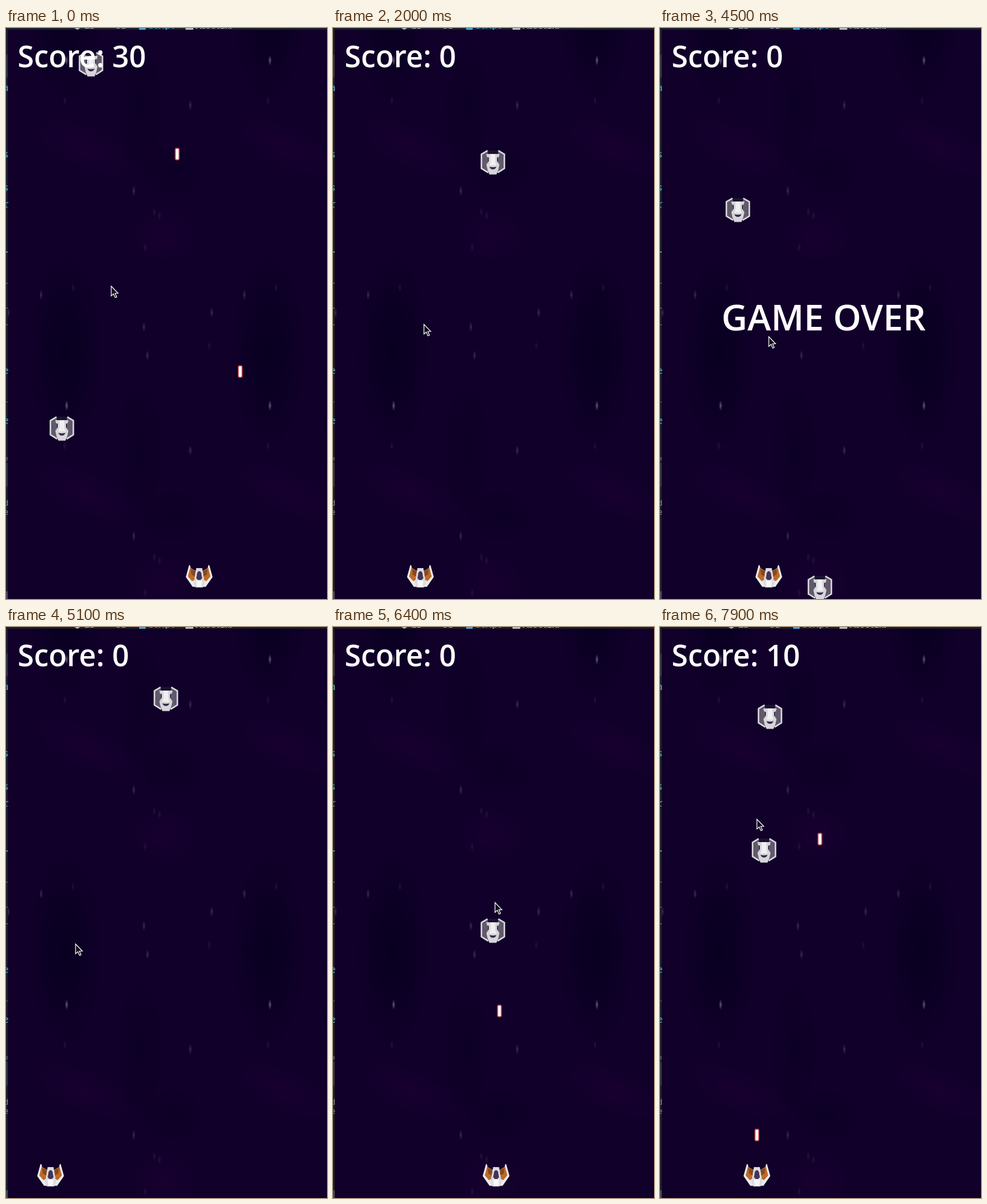
Recreate the animation shown at these times as an HTML page. Size 540 px wide and 961 px high, loop 8 s.

```html
<!DOCTYPE html>
<html lang="en">
<head>
<meta charset="utf-8">
<title>Space shooter</title>
<style>
  html, body { margin: 0; width: 100%; height: 100%; overflow: hidden; background: #1b2028; }
  svg { display: block; width: 100vw; height: 100vh; }
  .hud { font-family: "Open Sans", "Noto Sans", sans-serif; font-weight: 600; fill: #fff; }
  .tabs { font: 600 15px "Noto Sans", sans-serif; fill: #b4b8bf; }
  .code { font: 16px "Noto Sans Mono", monospace; text-anchor: end; fill: #57b3c8; }
  .log { font-size: 12px; fill: #8d939b; }
</style>
</head>
<body>
<svg viewBox="0 0 540 961" preserveAspectRatio="none">
  <defs>
    <clipPath id="win"><rect x="3" y="3" width="537" height="958"/></clipPath>
    <radialGradient id="dark"><stop stop-color="#06001e"/><stop offset=".5" stop-color="#06001e" stop-opacity=".6"/><stop offset="1" stop-color="#06001e" stop-opacity="0"/></radialGradient>
    <radialGradient id="light"><stop stop-color="#230038"/><stop offset="1" stop-color="#230038" stop-opacity="0"/></radialGradient>
    <radialGradient id="star"><stop stop-color="#a29bb4"/><stop offset=".4" stop-color="#8d86a0" stop-opacity=".6"/><stop offset="1" stop-color="#8d86a0" stop-opacity="0"/></radialGradient>

    <g id="enemy">
      <path d="M-8-20H8L10-13H-10Z" fill="#1c1230"/>
      <g id="wing">
        <path d="M-9-19L-19-13V10L-8 17V-12Z" fill="#625a6c"/>
        <path d="M-9-19.500L-19.300-13.500V10.500L-8 17.500" fill="none" stroke="#dddce0" stroke-width="2.500"/>
      </g>
      <use href="#wing" transform="scale(-1 1)"/>
      <path d="M-11-14H11L10-9L7-8V-2L11 4L9 13L6 20.500H-6L-9 13L-11 4L-7-2V-8L-10-9Z" fill="#d6d5d9"/>
      <path d="M-4-14H4V-1L6 5H-6L-4-1Z" fill="#efeff1"/>
      <path d="M-6 7.500Q0 9 6 7.500Q4 12 0 12Q-4 12-6 7.500Z" fill="#352a50"/>
    </g>

    <g id="ship">
      <g id="side">
        <path d="M-17-18L-22.500 2L-11 18.500H0V8L-6 6L-5-8L-14-12L-15.500-18Z" fill="#ececef"/>
        <path d="M-15-14L-6-8L-8 7L-12 9L-19 1Z" fill="#bd6a28"/>
        <path d="M-14-11L-6-8L-7 1L-13-2Z" fill="#87491f"/>
      </g>
      <use href="#side" transform="scale(-1 1)"/>
      <path d="M-5-13H5L8 6L10 11L6 19.500H-6L-10 11L-8 6Z" fill="#dcdbe0"/>
      <path d="M-5 8H5L4 19H-4Z" fill="#f7f7f8"/>
      <path d="M0-8Q4-7 4-1L5 4L2 7H-2L-5 4L-4-1Q-4-7 0-8Z" fill="#41345a"/>
    </g>

    <rect id="bullet" x="-3.300" y="-9.800" width="6.600" height="19.600" rx="2.200" fill="#fff" stroke="#b93a38" stroke-width="1.700"/>
    <g id="tile"></g>
  </defs>

  <g class="tabs">
    <path d="M115 0H125L120 3Z"/>
    <rect x="224" width="11" height="3" fill="#4b9fd8"/>
    <rect x="302" width="13" height="3"/>
    <text x="132" y="1">2D</text>
    <text x="185" y="1">3D</text>
    <text x="240" y="1" fill="#4b9fd8">Script</text>
    <text x="319" y="1">AssetLib</text>
  </g>
  <path d="M0 45H3V83H0ZM0 732H3V772H0Z" fill="#303640"/>
  <path d="M0 429.500H3M0 471.500H3M0 499.500H3" stroke="#777d85"/>
  <path d="M0 377H3" stroke="#5fc6c2" stroke-width="1.500"/>
  <path d="M0 629.500H3" stroke="#a34848"/>
  <path d="M0 722H3V728H0ZM0 948H3V961H0Z" fill="#454a52"/>

  <g clip-path="url(#win)">
    <rect x="3" y="3" width="537" height="958" fill="#11002a"/>
    <g id="sky"></g>
    <g id="actors"></g>
    <use id="player" href="#ship"/>
    <text class="hud" id="score" x="19.500" y="66" font-size="50"></text>
    <text class="hud" id="over" x="103.500" y="509" font-size="60">GAME OVER</text>
  </g>
  <g class="code" id="letters">
    <text class="log" x="4" y="804">d</text>
    <text class="log" x="4" y="819">e</text>
  </g>
  <path id="cursor" d="M0 0V16.500L3.800 13L6.700 19.300L9.300 18.200L6.500 12H11.500Z" fill="#15101c" stroke="#fff" stroke-width="1.200"/>
</svg>
<script>
const $ = id => document.getElementById(id);
const add = (parent, tag, attrs) => {
  const el = document.createElementNS("http://www.w3.org/2000/svg", tag);
  for (const k in attrs) el.setAttribute(k, attrs[k]);
  return parent.appendChild(el);
};
const blob = (fill, x, y, rx, ry, opacity, turn = 0) => add($("tile"), "ellipse", {
  rx, ry, opacity, fill: `url(#${fill})`, transform: `translate(${x} ${y}) rotate(${turn})`
});

// Repeating sky: soft clouds, the brighter stars, then a few faint seeded ones
const TILE_W = 342, TILE_H = 581;
blob("light", 130, 200, 100, 40, .4, 25);
blob("light", 265, 350, 60, 50, .4);
blob("dark", 100, 545, 62, 165, .8);
blob("dark", 225, 130, 40, 120, .4);
blob("dark", 280, 240, 55, 45, .4);
blob("star", 102, 54.5, 3, 9, .65);
for (const [x, y] of [[310, 130], [215, 274], [346, 479], [232, 503], [238, 551], [59, 449]])
  blob("star", x, y, 3, 9, .32);
let seed = 7;
const random = () => (seed = seed * 16807 % 2147483647) / 2147483647;
for (let i = 0; i < 6; i++) blob("star", random() * TILE_W, random() * TILE_H, 3, 8, .14);
for (const i of [-1, 0, 1])
  for (const j of [-1, 0, 1]) add($("sky"), "use", { href: "#tile", x: i * TILE_W, y: j * TILE_H });

// Code lines of the editor, one character per row, peeking out beside the window
[..."a   s sr         e  e"].forEach((c, row) => {
  add($("letters"), "text", { x: 4.5, y: 106 + row * 28 }).textContent = c;
});

// Game clock against play time: it freezes, catches up and then runs on
const clock = [[0, 0], [2600, 2600], [3200, 2600], [3300, 3407], [3400, 3407], [3800, 3687],
  [7100, 6987], [7900, 7807]];

// Born and gone are game times; enemies start at the top edge, bullets at the ship
const height = {
  enemy: age => age * .3,
  bullet: age => 895 - age * .4
};
const actor = (shape, x, born, gone = Infinity) =>
  ({ shape, x, born, gone, el: add($("actors"), "use", { href: "#" + shape }) });
const actors = [
  actor("bullet", 288, -1707),
  actor("bullet", 394, -792, 1200),
  actor("bullet", 280, 5665, 6487),
  actor("bullet", 269, 6462),
  actor("bullet", 163, 7707),
  actor("enemy", 94, -2247, 1200),
  actor("enemy", 143, -203, 1200),
  actor("enemy", 269, 1247, 4587),
  actor("enemy", 131, 3367, 4587),
  actor("enemy", 269, 4584, 6487),
  actor("enemy", 175, 6554),
  actor("enemy", 185, 7304)
];

// Time, x, y
const pointer = [[-100, 325, 410], [0, 177, 434], [100, 77, 457], [1000, 77, 457],
  [1200, 105, 465], [2500, 183, 519], [4700, 183, 519], [5000, 75, 530],
  [5500, 285, 545], [5700, 285, 545], [6600, 269, 440], [7100, 205, 382], [7500, 163, 323]];

function at(keys, t, i = 1) {
  const n = keys.findIndex(k => k[0] >= t);
  if (n <= 0) return keys[n < 0 ? keys.length - 1 : 0][i];
  const a = keys[n - 1], b = keys[n];
  return a[i] + (b[i] - a[i]) * (t - a[0]) / (b[0] - a[0]);
}
const within = (t, from, to) => t >= from && t < to;
const show = (el, on) => el.setAttribute("visibility", on ? "visible" : "hidden");
const move = (el, x, y) => el.setAttribute("transform", `translate(${x} ${y})`);

function draw(t) {
  const now = at(clock, t);
  for (const { shape, x, born, gone, el } of actors) {
    // Enemies may wait just above the edge before they are born
    show(el, now < gone && (shape === "enemy" || now >= born));
    move(el, x, height[shape](now - born));
  }
  move($("cursor"), at(pointer, t), at(pointer, t, 2) + .5);
  move($("player"), at(pointer, t - 100), 922);   // the ship trails the pointer
  show($("player"), !within(t, 700, 1200));
  show($("over"), within(t, 700, 1200) || within(t, 4400, 4700));
  $("score").textContent = "Score: " + (t < 1200 ? 30 : t < 6600 ? 0 : 10);
}

const start = performance.now();
function tick(now) {
  const t = Math.max(0, now - start) % 8000;
  draw(Math.floor(t / 100) * 100);   // ten pictures a second
  requestAnimationFrame(tick);
}
draw(0);
requestAnimationFrame(tick);
</script>
</body>
</html>
```
